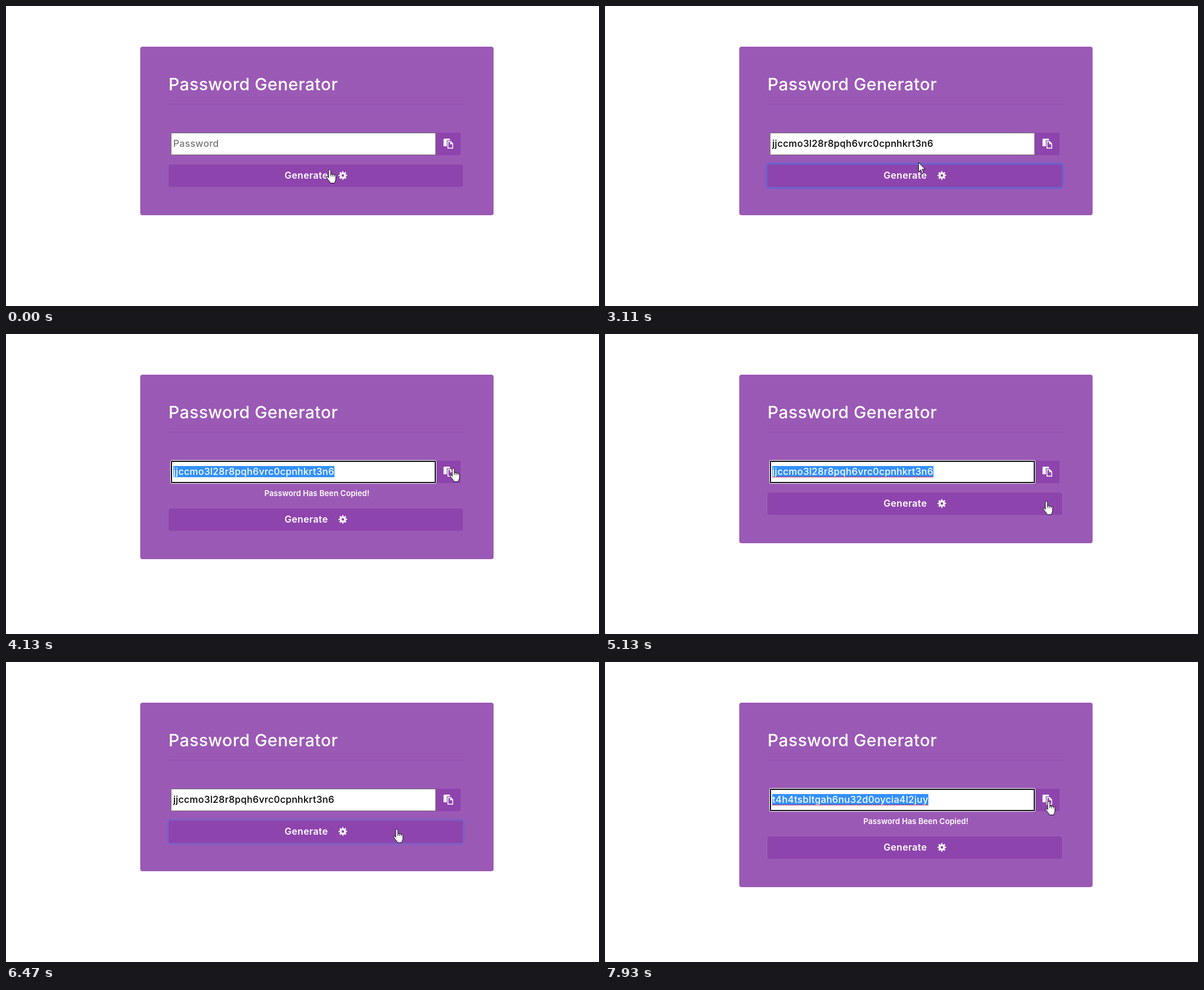
An HTML page for the animation above (8 s loop, 1007 by 509 pixels).

```html
<!DOCTYPE html>
<html lang="en">
<head>
<meta charset="utf-8">
<title>Password Generator</title>
<style>
html, body { margin: 0; width: 100%; height: 100%; overflow: hidden; background: #fff; }
svg { display: block; }
text { font: 500 16px Inter, "Open Sans", sans-serif; font-optical-sizing: none; letter-spacing: .33px; fill: #fff; }
#title { font-size: 28.8px; letter-spacing: .4px; }
#note { font-size: 13px; font-weight: 600; letter-spacing: .08px; }
#label { font-weight: 600; }
.btn { fill: #8e44ad; }
#cursor path { fill: #fff; stroke: #000; stroke-width: .9; stroke-linejoin: round; }
</style>
</head>
<body>
<svg width="1007" height="509" viewBox="0 0 1007 509">
  <rect id="card" x="228" y="69" width="600" height="286" rx="4" fill="#9b59b6"/>
  <text id="title" x="276" y="143">Password Generator</text>
  <path d="M276 166.5H780" stroke="#904aaf"/>

  <rect class="btn" x="728" y="215" width="44" height="38" rx="3"/>
  <path d="M743 226.5q0-1.500 1.500-1.500h8q1.500 0 1.500 1.500v11.500h-11z" fill="#fff"/>
  <g class="btn">
    <path id="page" d="M750.5 230h4.500l3.500 3.500v7.700h-8zM755 230v3.700h3.500" stroke="#8e44ad" stroke-width="4"/>
    <path d="M750.5 230h4.500l3.500 3.500v7.700h-8zM755 230v3.700h3.500" stroke="#fff" stroke-width="1.500"/>
  </g>

  <rect x="280.5" y="215.5" width="449" height="37" fill="#fff" stroke="#767676"/>
  <g id="focus" fill="none">
    <rect x="279.5" y="214.5" width="451" height="39" rx="2" stroke="#fff"/>
    <rect x="281" y="216" width="448" height="36" rx="1" stroke="#101010" stroke-width="2"/>
  </g>
  <rect id="select" x="284" y="224" height="19" fill="#3390ff"/>
  <text id="field" x="284" y="239"></text>
  <path id="squiggle" stroke="#d02050" stroke-width="1.300" stroke-dasharray="2 1"/>

  <text id="note" x="528" y="275" text-anchor="middle">Password Has Been Copied!</text>
  <g id="generate">
    <rect id="ring" x="272.8" y="265.8" width="506.400" height="44.400" rx="7" fill="#007bff"/>
    <rect class="btn" x="276" y="269" width="500" height="38" rx="4"/>
    <text id="label" x="473" y="293">Generate</text>
    <g fill="none" stroke="#fff">
      <circle cx="572" cy="287.5" r="3.800" stroke-width="3"/>
      <circle cx="572" cy="287.5" r="6.100" stroke-width="2.200" pathLength="16" stroke-dasharray="1" stroke-dashoffset=".5"/>
    </g>
  </g>

  <g id="cursor">
    <circle id="press" cy="-1" r="12" fill="#c4955f"/>
    <g id="hand">
      <path d="M-1.100 13.500V1.200a1.700 1.700 0 0 1 3.400 0V8a1.600 1.600 0 0 1 3 .4 1.600 1.600 0 0 1 3 .8 1.500 1.500 0 0 1 2.700 1V16c0 3-2 4-2 6.500H1.500C1.500 20-1.500 18-4 14-6 11-3.500 10-1.100 13.500Z"/>
      <path d="M2.300 8v3M5.300 8.500v3M8.300 9.500v2"/>
    </g>
    <path id="arrow" d="M.5 .5V16.500L4.200 13 6.800 19 9.200 18 6.600 12H11.500Z"/>
    <path id="beam" d="M-3-8H3M0-8V8M-3 8H3"/>
  </g>
</svg>
<script>
const LOOP = 8000, STEP = 77, RELEASE = 75;
const $ = id => document.getElementById(id);
const show = (id, on) => $(id).style.display = on ? "" : "none";
const ramp = (v, a, b) => Math.min(1, Math.max(0, (v - a) / (b - a)));

const words = ["Password", "jjccmo3l28r8pqh6vrc0cpnhkrt3n6", "t4h4tsbltgah6nu32d0oycia4l2juy"];
const clicks = [[870, "generate"], [4040, "copy"], [5980, "press"], [6620, "generate"], [7780, "copy"]];

// Pointer glides: start, end, destination, optional curve control point
const home = [549, 278];
const glides = [
  [170, 320, [504, 295]],
  [870, 1110, [510, 287]],
  [3110, 3890, [759, 228], [628, 158]],
  [4910, 5680, [663, 284], [764, 332]],
  [7170, 7400, [784, 236], [675, 244]],
  [7550, 7630, [753, 237]]
];

// Quadratic curve, sampled in steps like a screen recording
function pointer(t) {
  let from = home;
  for (const [start, end, to, via] of glides) {
    if (t < start) break;
    const last = Math.round((end - start) / STEP);
    const k = Math.floor((t - start) / (end - start) * last + .2);
    const u = Math.min(1, (k + 1) / (last + 1));
    from = from.map((a, i) => {
      const c = via ? via[i] : (a + to[i]) / 2;
      return Math.round((1 - u) ** 2 * a + 2 * u * (1 - u) * c + u * u * to[i]);
    });
  }
  return from;
}

function ringLevel(action, previous, age) {
  if (action === "press") return .6 * ramp(age, 0, 260);
  if (action !== "generate") return 0;
  const rest = previous === "press" ? .6 : 0;
  return rest + (1 - rest) * ramp(age, 0, 150);
}

function draw(t) {
  const past = clicks.filter(c => t >= c[0]);
  const [when, action] = past.at(-1) || [-LOOP];
  const previous = past.at(-2)?.[1];
  const age = t - when;
  const made = past.filter(c => c[1] === "generate" && t >= c[0] + RELEASE).length;
  const copied = action === "copy" && age >= RELEASE;
  const note = copied && age < 1020, shift = note ? 27 : 0;

  const field = $("field");
  field.textContent = words[made];
  field.style.fill = copied ? "#fff" : made ? "#000" : "#757575";
  const width = field.getComputedTextLength();
  $("select").setAttribute("width", width);
  $("squiggle").setAttribute("d", `M284 242.5h${width}`);
  show("select", copied);
  show("focus", copied);
  show("squiggle", copied && age >= 140);

  show("note", note);
  $("card").setAttribute("height", 286 + shift);
  $("generate").setAttribute("transform", `translate(0 ${shift})`);
  $("ring").setAttribute("opacity", .3 * ringLevel(action, previous, age));

  const [x, y] = pointer(t);
  const inside = (l, top, r, b) => x >= l && x < r && y >= top && y < b;
  const hand = inside(730, 215, 772, 253) || inside(276, 269 + shift, 776, 307 + shift);
  const beam = inside(280, 215, 730, 253);
  $("cursor").setAttribute("transform", `translate(${x} ${y})`);
  show("hand", hand);
  show("beam", beam);
  show("arrow", !hand && !beam);
  show("press", age < RELEASE);
}

const began = performance.now();
function tick(now) {
  draw(Math.max(0, now - began) % LOOP);
  requestAnimationFrame(tick);
}
draw(0);
requestAnimationFrame(tick);
</script>
</body>
</html>
```
